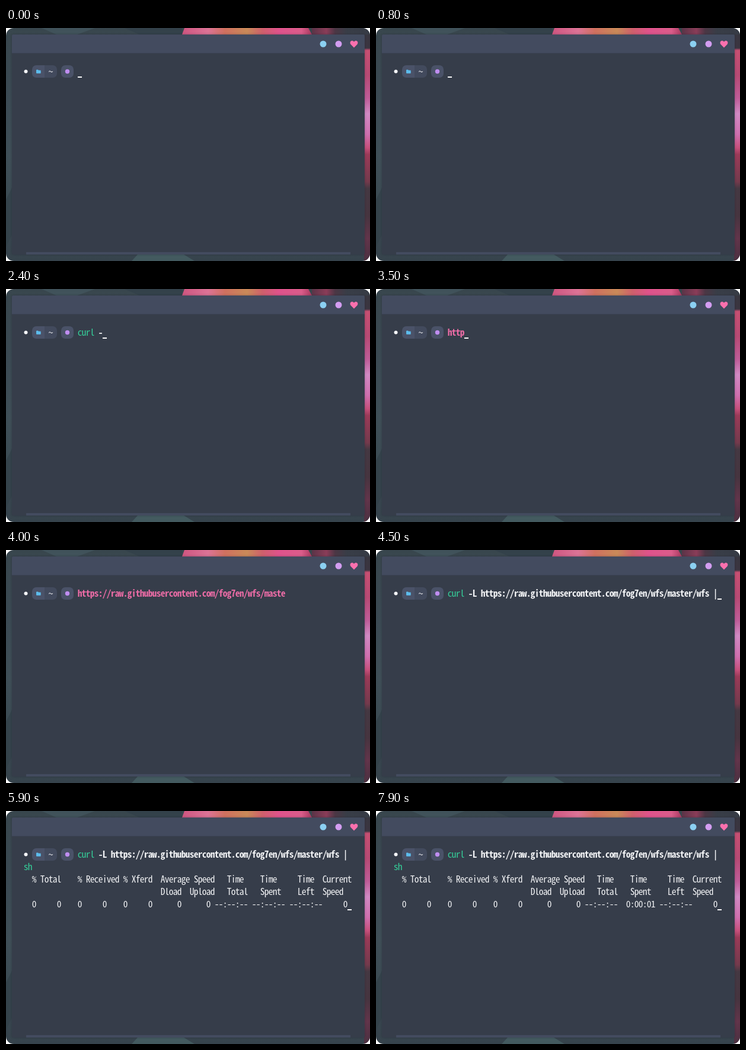
Animation of 614x394 px, one loop 8 s. Source, as an HTML page with a canvas:

```html
<!DOCTYPE html>
<html lang="en">
<head>
<meta charset="utf-8">
<title>Terminal</title>
<style>
  html, body { margin: 0; width: 100%; height: 100%; overflow: hidden; background: #fff; }
  canvas { display: block; width: 614px; height: 394px; }
</style>
</head>
<body>
<canvas id="stage" width="614" height="394"></canvas>
<script>
const ctx = document.getElementById('stage').getContext('2d');
const WIDTH = 614, HEIGHT = 394, LOOP = 8000;
const CELL = 7, LINE = 21, COLUMNS = 79, LEFT = 30, BASELINE = 79, PROMPT_COLUMNS = 13;
const WHITE = '#f4f5f7', PINK = '#ec6ca6', GREEN = '#35d49c';
const FAMILY = '"Noto Sans Mono CJK JP", "Noto Sans Mono CJK SC", "Noto Sans Mono", monospace';

const URL_TEXT = 'https://raw.githubusercontent.com/fog7en/wfs/master/wfs';
const FULL = 'curl -L ' + URL_TEXT;
const HEADER = [
  '  % Total    % Received % Xferd  Average Speed   Time    Time     Time  Current',
  '                                 Dload  Upload   Total   Spent    Left  Speed'
];
const progress = spent =>
  `  0     0    0     0    0     0      0      0 --:--:-- ${spent} --:--:--     0`;

// [start time, command line]
const edits = [
  [0, ''], [1400, 'c'], [1600, 'cu'], [1900, 'cur'], [2000, 'curl'], [2200, 'curl '],
  [2400, 'curl -'], [2700, 'curl -L'], [2900, 'curl -L '],
  [4100, FULL], [4400, FULL + ' '], [4500, FULL + ' |'], [4900, FULL + ' | '],
  [5300, FULL + ' | s'], [5500, FULL + ' | sh']
];
const cursorOff = [[400, 800], [1200, 1400], [4000, 4100], [6400, 6900], [7400, 7900]];

function commandAt(t) {
  if (t >= 3500 && t < 4100) {
    const step = Math.floor((t - 3500) / 100);
    return URL_TEXT.slice(0, Math.round(4 + step * 9.2));
  }
  return edits.filter(([start]) => t >= start).pop()[1];
}

// The terminal sets its glyphs a little tighter than their natural advance
const TIGHTNESS = 1.1;
ctx.font = `100px ${FAMILY}`;
const fontSize = 100 * CELL / ctx.measureText('0').width * TIGHTNESS;
ctx.textAlign = 'center';

function put(text, start, color, bold) {
  ctx.font = `${bold ? 'bold ' : ''}${fontSize}px ${FAMILY}`;
  ctx.fillStyle = color;
  [...text].forEach((char, i) => {
    const cell = start + i;
    const x = LEFT + (cell % COLUMNS + .5) * CELL;
    ctx.fillText(char, x, BASELINE + Math.floor(cell / COLUMNS) * LINE);
  });
}

function putCommand(command) {
  let expectsProgram = true;
  for (const { 0: word, index } of command.matchAll(/\S+/g)) {
    const known = word === 'curl' || word === 'sh';
    const color = !expectsProgram ? WHITE : known ? GREEN : PINK;
    put(word, PROMPT_COLUMNS + index, color, color !== GREEN);
    expectsProgram = word === '|';
  }
}

function rect(x, y, w, h, fill, radius = 0) {
  ctx.fillStyle = fill;
  ctx.beginPath();
  ctx.roundRect(x, y, w, h, radius);
  ctx.fill();
}

function circle(x, y, r, fill) {
  ctx.fillStyle = fill;
  ctx.beginPath();
  ctx.arc(x, y, r, 0, 2 * Math.PI);
  ctx.fill();
}

function shape(path, fill) {
  ctx.fillStyle = fill;
  ctx.fill(new Path2D(path));
}

function gradient(x0, y0, x1, y1, ...stops) {
  const g = ctx.createLinearGradient(x0, y0, x1, y1);
  stops.forEach(([at, color]) => g.addColorStop(at, color));
  return g;
}

function drawPhoto() {
  // leaves
  rect(0, 0, WIDTH, HEIGHT, gradient(0, 0, 0, HEIGHT,
    [0, '#38464d'], [.3, '#3b4a53'], [.55, '#3f4f57'], [.8, '#3a4a52'], [1, '#36434c']));
  shape('M212 394L222 383H300L318 394Z', '#435a5f');
  shape('M60 0H150L120 11H85Z', '#40525a');
  shape('M200 0H297V11H225Z', '#33414a');
  shape('M0 290L10 270V350L0 370Z', '#34434b');

  // flower along the top
  shape('M297 11L301 0H510L516 11Z', gradient(297, 0, 516, 0,
    [0, '#cf5580'], [.2, '#dc7396'], [.33, '#d0705f'], [.5, '#c98a58'], [.62, '#cf5f6c'],
    [.75, '#e0528c'], [.92, '#da5c8a'], [1, '#a8385e']));
  rect(516, 0, 98, 11, gradient(516, 0, 614, 0,
    [0, '#5a3447'], [.25, '#8a3c58'], [.4, '#4b3644'], [.6, '#383d47'], [1, '#363b45']));

  // petals down the right side
  rect(604, 11, 10, 383, gradient(0, 11, 0, 394,
    [0, '#37363f'], [.06, '#3b3440'], [.07, '#c84f72'], [.18, '#b84a74'], [.28, '#c05c98'],
    [.35, '#d28ac4'], [.44, '#d070b0'], [.5, '#c8507c'], [.53, '#9c3a58'], [.65, '#743a4c'],
    [.68, '#443842'], [.8, '#46343f'], [.9, '#62344a'], [1, '#4a3040']));
}

function drawWindow() {
  ctx.save();
  ctx.shadowColor = 'rgba(20, 24, 32, .3)';
  ctx.shadowBlur = 4;
  rect(10, 11, 595, 372, '#363d4a', 2);
  ctx.restore();
  rect(10, 11, 595, 31.5, '#434b5f', [2, 2, 0, 0]);
  rect(34, 379, 547, 4, '#434b5f');

  circle(535, 27, 5.5, '#8bd0f2');
  circle(561, 27, 5.5, '#d39df1');
  shape('M587 33.2L581.6 27.7C578.5 24 583 18.8 587 23.2C591 18.8 595.5 24 592.4 27.7Z', '#fb70ae');
}

function drawPrompt() {
  circle(33.5, 73.5, 3, WHITE);
  rect(44, 63, 21, 21, '#4a5268', [7, 0, 0, 7]);
  rect(65, 63, 21, 21, '#424a5d', [0, 7, 7, 0]);
  rect(93, 63, 21, 21, '#4a5268', 7);
  shape('M51 71Q51 70.5 52 70.5H54L55 71.5H58Q58.7 71.5 58.7 72.3V76Q58.7 76.8 58 76.8H52Q51 76.8 51 76Z', '#5cbcec');
  put('~', 6, WHITE, false);
  circle(103.5, 73.5, 3.7, '#bf8df0');
}

function draw(t) {
  ctx.clearRect(0, 0, WIDTH, HEIGHT);
  ctx.save();
  ctx.beginPath();
  ctx.roundRect(0, 0, WIDTH, HEIGHT, 13);
  ctx.clip();
  drawPhoto();
  drawWindow();
  drawPrompt();

  const command = commandAt(t);
  putCommand(command);
  let cursor = PROMPT_COLUMNS + command.length;
  if (t >= 5900) {
    const lines = [...HEADER, progress(t < 7000 ? '--:--:--' : ' 0:00:01')];
    lines.forEach((line, i) => put(line, (i + 2) * COLUMNS, WHITE, false));
    cursor = 5 * COLUMNS - 1;
  }
  if (!cursorOff.some(([from, to]) => t >= from && t < to)) {
    rect(LEFT + cursor % COLUMNS * CELL, 82 + Math.floor(cursor / COLUMNS) * LINE, CELL, 2, '#fff');
  }
  ctx.restore();
}

const begin = performance.now();
(function frame() {
  draw((performance.now() - begin) % LOOP);
  requestAnimationFrame(frame);
})();
</script>
</body>
</html>
```
